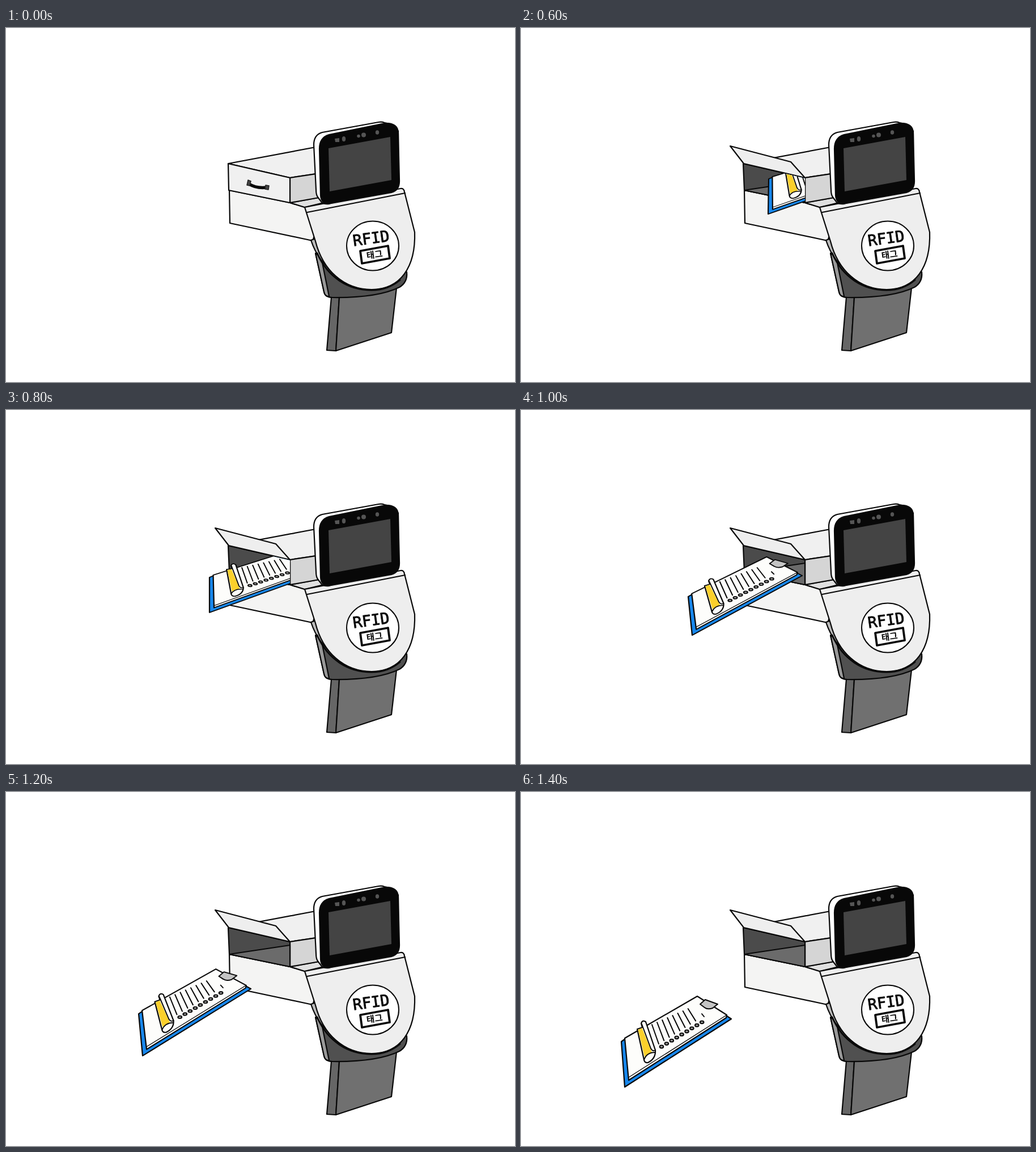
Recreate the animation shown at these times as an HTML page. Size 898 px wide and 624 px high, loop 1600 ms.

```html
<!DOCTYPE html>
<html lang="ko">
<head>
<meta charset="utf-8">
<title>RFID 태그</title>
<style>
  html, body { margin: 0; width: 100%; height: 100%; overflow: hidden; background: #fff; }
  svg { display: block; width: 898px; height: 624px; stroke: #080808; stroke-width: 2.2; stroke-linejoin: round; stroke-linecap: round; }
  .plain { stroke: none; }
  .line { fill: none; }
  text { font-family: "DejaVu Sans Mono", monospace; text-anchor: middle; fill: #080808; stroke-width: .9; }
  .korean { font-family: "Noto Sans CJK KR", "Noto Sans CJK", sans-serif; font-weight: 700; stroke: none; }
</style>
</head>
<body>
<svg viewBox="0 0 898 624">
  <clipPath id="opening"><path d="M0 200L393 240L501 265V624H0Z"/></clipPath>

  <!-- box -->
  <path d="M394 286L395 344L541 375L556 330L527 316L501 308Z" fill="#f4f4f3"/>
  <path d="M501 308L551 299L560 308L527 316Z" fill="#e0e0e0"/>
  <path d="M392 239L546 210V257L501 264Z" fill="#f0f0f0"/>
  <path d="M501 264L548 257L552 299L501 308Z" fill="#d5d5d5"/>

  <g id="closed">
    <path d="M392 239L501 264V308L393 286Z" fill="#f0f0f0"/>
    <path class="line" d="M429 275Q441 283 460 281" stroke-width="5.5"/>
    <path d="M427 268L432 270L430 278L425 277ZM458 277L464 278L463 285L457 284Z" fill="#444" stroke="#222" stroke-width="1.5"/>
  </g>

  <g id="open">
    <path d="M392 239L501 264V308L394 286Z" fill="#4b4b4b"/>
    <path d="M394 286L501 270V308Z" fill="#6b6b6b"/>
    <path d="M369 208L476 236L501 264L393 239Z" fill="#eee"/>
  </g>

  <!-- stand -->
  <path d="M574 474H588L582 569L566 568Z" fill="#666"/>
  <path d="M588 475L689 458L680 537L582 569Z" fill="#707070"/>
  <path d="M546 397L561 465Q563 475 576 475Q655 476 694 457Q709 448 707 430L640 400Z" fill="#505050"/>
  <path d="M546 397L556 404L570 473Q563 474 561 465Z" fill="#999"/>
  <path d="M538 374L550 370L580 430Q551 413 538 374Z" fill="#bbb"/>
  <path d="M527 316L696 283Q702 282 703 289L721 360C723 421 696 461 645 461C596 461 559 427 546 376Z" fill="#eee"/>
  <path class="line" d="M531 325L704 291"/>
  <path class="line" d="M549 397C568 440 604 462 645 462C665 462 682 455 695 444" stroke-width="3"/>

  <!-- tag label -->
  <ellipse cx="647" cy="384" rx="46" ry="43.5" fill="#fff" stroke-width="2"/>
  <text font-size="27" transform="translate(645.5 380) rotate(-8)">RFID</text>
  <path d="M625 393L674 384L677 406L628 415Z" fill="#fff" stroke-width="3.8"/>
  <text class="korean" font-size="15.5" transform="translate(651 405) rotate(-8)">태그</text>

  <!-- tablet -->
  <path d="M543 206Q543 188 558 184L657 166Q663 165 668 167L684 171L692 182V270L570 310Q560 311 556 306L550 298Q547 294 547 285Z" fill="#fff"/>
  <path d="M553 213Q553 193 570 188L668 168Q692 167 692 186L694 270Q694 286 680 290L574 309Q556 312 555 295Z" fill="#080808"/>
  <path class="plain" d="M569 212L678 192L680 268L571 288Z" fill="#444"/>
  <g class="plain" fill="#555">
    <path d="M580 195L588 194V201H581Z"/>
    <ellipse cx="596" cy="195.5" rx="3.2" ry="4.5"/>
    <circle cx="622" cy="190.5" r="2.8"/>
    <circle cx="631" cy="188.5" r="4"/>
    <ellipse cx="655" cy="184" rx="3.2" ry="3.8"/>
  </g>

  <g clip-path="url(#opening)">
    <g id="clipboard">
      <path d="M177 440L184 435L311 361L371 400L183 520Z" fill="#1787ec"/>
      <path d="M183 434L311 360L363 393L362 398L190 508Z" fill="#fdfdfb"/>
      <path class="line" d="M190 503L363 393" stroke-width="1.4"/>
      <path d="M316 374L325 366L347 374L338 381Q329 384 324 380Z" fill="#c4c4c4" stroke-width="2"/>
      <g id="writing" fill="#999" stroke-width="2"></g>
      <path d="M205 418L217 472Q218 478 224 477Q238 470 237 455L220 405Q214 401 212 408L214 415Z" fill="#fdfdfb"/>
      <path class="plain" d="M206.5 419L213.5 416L231 459Q222 462 218 467Z" fill="#fbd02c"/>
      <path class="line" d="M213 409L229 452Q232 458 237 455M217 472Q222 459 236 459" stroke-width="1.9"/>
    </g>
  </g>
</svg>
<script>
  const byId = id => document.getElementById(id);

  // Ruled lines with a ring below each, and one short dash at the end.
  let marks = '<path class="line" d="M319 391L323 396"/>';
  for (let i = 0; i < 9; i++) {
    if (i < 8) marks += `<path class="line" d="M${231 + 9.1 * i} ${410 - 4 * i}L${243 + 9.3 * i} ${444 - 5.8 * i}"/>`;
    marks += `<ellipse cx="${248 + 8.9 * i}" cy="${449 - 5.4 * i}" rx="3.3" ry="2.4"/>`;
  }
  byId('writing').innerHTML = marks;

  // Each pose: bottom left, right and top left corners of the clipboard.
  const poses = [
    [[436, 328], [631, 260], [437, 266]],
    [[359, 357], [559, 285], [359, 295]],
    [[302, 397], [496, 292], [295, 329]],
    [[241, 465], [432, 347], [234, 391]],
    [[183, 520], [371, 400], [177, 440]]
  ];
  const frameOf = ([[x, y], [rx, ry], [tx, ty]]) =>
    new DOMMatrix([rx - x, ry - y, tx - x, ty - y, x, y]);
  const fromDrawing = frameOf(poses[4]).inverse();
  const transforms = poses.map(pose => {
    const { a, b, c, d, e, f } = frameOf(pose).multiply(fromDrawing);
    return `matrix(${a} ${b} ${c} ${d} ${e} ${f})`;
  });

  const LOOP = 1600, OPENS = 600, STEP = 200;
  const show = (id, visible) => byId(id).setAttribute('display', visible ? 'inline' : 'none');

  function draw() {
    const step = Math.floor((performance.now() % LOOP - OPENS) / STEP);
    const isOpen = step >= 0;
    show('closed', !isOpen);
    show('open', isOpen);
    show('clipboard', isOpen);
    if (isOpen) byId('clipboard').setAttribute('transform', transforms[step]);
    requestAnimationFrame(draw);
  }
  draw();
</script>
</body>
</html>
```
